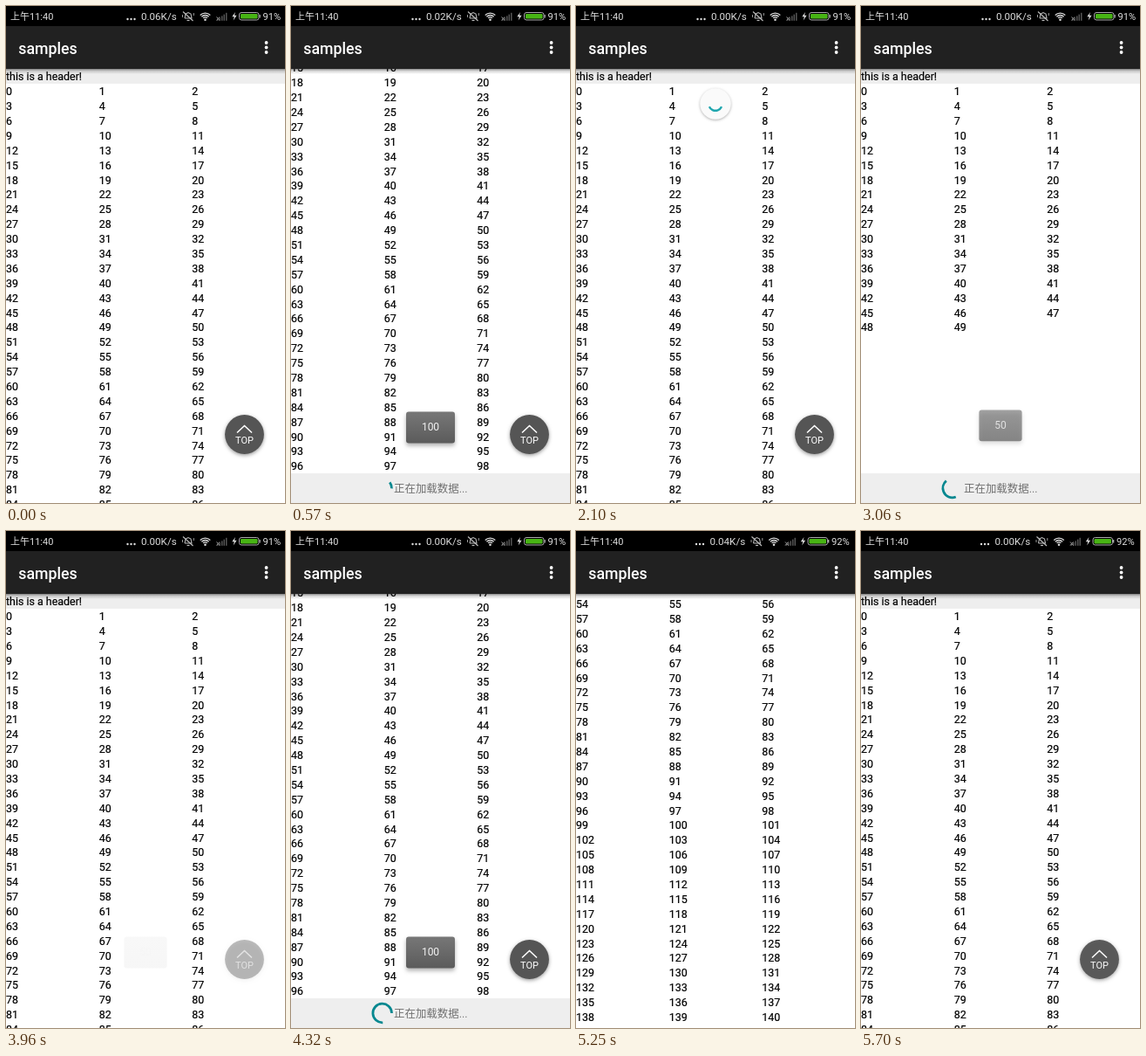
Animation of 320x569 px, one loop 5.79 s. Source, as an HTML page with a canvas:

```html
<!DOCTYPE html>
<html lang="zh">
<head>
<meta charset="utf-8">
<title>samples</title>
<style>
html, body { margin: 0; width: 100%; height: 100%; overflow: hidden; background: #fff; }
canvas { display: block; width: 320px; height: 569px; }
</style>
</head>
<body>
<canvas id="stage"></canvas>
<script>
const W = 320, H = 569, LOOP = 5790, ROW = 16.89, BAR = 72;
const FONT = 'Roboto, "Noto Sans CJK SC", "Noto Sans CJK", sans-serif';
const canvas = document.getElementById('stage');
const c = canvas.getContext('2d');
const dpr = window.devicePixelRatio || 1;
canvas.width = W * dpr;
canvas.height = H * dpr;

const LOAD_SCROLL = 111.3, END_SCROLL = 381.3;
const SCROLL = [[60, 0], [270, LOAD_SCROLL], [1140, LOAD_SCROLL], [1140, END_SCROLL],
  [1380, END_SCROLL], [1520, 0], [4020, 0], [4200, LOAD_SCROLL], [5040, LOAD_SCROLL],
  [5040, END_SCROLL], [5220, END_SCROLL], [5340, 0]];
const COUNT = [[0, 100], [1140, 150], [2940, 50], [3750, 100], [5040, 150]];
const TOP_ALPHA = [[1380, 1], [1380, 0], [1520, 0], [1780, 1], [2940, 1], [2940, 0],
  [3780, 0], [4250, 1], [5220, 1], [5220, 0], [5420, 0], [5715, 1]];
const PULL = [[1590, 50], [1740, 137], [1830, 137], [1980, 112]];
const SPEED = [[0, '0.06'], [300, '0.02'], [900, '0.00'], [4350, '0.03'], [4650, '0.00'],
  [5130, '0.04'], [5550, '0.00']];

const clamp = x => Math.max(0, Math.min(1, x));
const ease = x => { x = clamp(x); return x * x * (3 - 2 * x); };

// Interpolated value of a [time, value] track.
function track(keys, t, curve = ease) {
  let prev = keys[0];
  for (const key of keys) {
    if (key[0] > t) {
      if (key === prev) return key[1];
      return prev[1] + (key[1] - prev[1]) * curve((t - prev[0]) / (key[0] - prev[0]));
    }
    prev = key;
  }
  return prev[1];
}

// Latest value of a stepped track.
const step = (keys, t) => keys.filter(k => k[0] <= t).pop()[1];

function text(str, x, y, size, color, align = 'left', weight = 400, bold = 0) {
  c.save();
  c.font = `${weight} ${size}px ${FONT}`;
  c.fillStyle = c.strokeStyle = color;
  c.textAlign = align;
  c.translate(x, y);
  c.rotate(1e-4); // keeps the baseline from snapping to whole pixels
  c.fillText(str, 0, 0);
  if (bold) {
    c.lineWidth = bold;
    c.strokeText(str, 0, 0);
  }
  c.restore();
}

const listText = (str, x, top) => text(str, x, top + 13.3, 12.44, '#000', 'left', 400, 0.2);

function rect(x, y, w, h, color) {
  c.fillStyle = color;
  c.fillRect(x, y, w, h);
}

function disc(x, y, r, color) {
  c.fillStyle = color;
  c.beginPath();
  c.arc(x, y, r, 0, 2 * Math.PI);
  c.fill();
}

function line(points, color, width) {
  c.strokeStyle = color;
  c.lineWidth = width;
  c.beginPath();
  points.forEach(p => c.lineTo(...p));
  c.stroke();
}

function shadow(alpha, blur, dy) {
  c.shadowColor = `rgba(0,0,0,${alpha})`;
  c.shadowBlur = blur * dpr;
  c.shadowOffsetY = dy * dpr;
}

const noShadow = () => shadow(0, 0, 0);

function arc(x, y, r, from, sweep, color, width) {
  const rad = Math.PI / 180;
  c.strokeStyle = color;
  c.lineWidth = width;
  c.beginPath();
  c.arc(x, y, r, from * rad, (from + sweep) * rad);
  c.stroke();
}

// Indeterminate ring: the head runs ahead, then the tail catches up.
function ring(x, y, r, t, origin, base, color, width) {
  const n = (t - origin) / 580, p = n - Math.floor(n);
  const head = ease(2 * p), tail = ease(2 * p - 1);
  arc(x, y, r, base + 250 * tail + 110 * p, 40 + 250 * (head - tail), color, width);
}

function drawList(t) {
  const count = step(COUNT, t), scroll = track(SCROLL, t);
  const top = BAR + ROW - scroll;
  rect(0, top - ROW, W, ROW, '#eee');
  listText('this is a header!', 0, top - ROW);
  for (let i = 0; i < count; i++) {
    const y = top + Math.floor(i / 3) * ROW;
    if (y > BAR - ROW && y < H) listText(i, (i % 3) * W / 3, y);
  }
  if (count === 150) {
    const y = top + 50 * ROW;
    rect(0, y, W, ROW + 1, '#eee');
    listText('there is no more data,this is a footer!', 0, y);
    return;
  }
  const y = count === 50 ? 535 : 535 + LOAD_SCROLL - scroll;
  if (y >= H) return;
  rect(0, y, W, 35, '#eee');
  const phase = t < 2000 ? [570, -38] : [4658, 41];
  ring(104.7, y + 17, 10.8, t, ...phase, '#078890', 2.8);
  text('正在加载数据...', 118, y + 22, 12.44, '#707070');
}

function drawPull(t) {
  if (t < 1590 || t >= 2940) return;
  const y = track(PULL, t), s = 1 - clamp((t - 2850) / 90);
  c.save();
  c.translate(160, y);
  c.scale(s, s);
  shadow(0.3, 3, 1);
  disc(0, 0, 17.8, '#fafafa');
  noShadow();
  if (t < 1830) arc(0, 0, 7.8, -70 + (y - 50) * 2, 280 * clamp((y - 60) / 70), '#1fa6ae', 2.4);
  else ring(0, 0, 7.8, t, 1983, 3, '#1fa6ae', 2.4);
  c.restore();
}

function drawTop(t) {
  const x = 273.5, y = 490.5, alpha = track(TOP_ALPHA, t, clamp);
  c.save();
  c.globalAlpha = alpha;
  shadow(0.4 * alpha, 4, 1.5);
  disc(x, y, 22.4, '#555');
  noShadow();
  c.globalAlpha = Math.sqrt(alpha);
  line([[x - 8.5, y - 2], [x, y - 10], [x + 8.5, y - 2]], '#fff', 1.6);
  text('TOP', x, y + 10.6, 11, '#fff', 'center');
  c.restore();
}

function drawToast(t, start, label) {
  const show = clamp((t - start) / 90), hide = clamp((t - start - 870) / 96);
  const alpha = show * (1 - hide);
  if (!alpha) return;
  const w = label.length * 6.75 + 35.7;
  c.save();
  c.globalAlpha = alpha;
  c.translate(160, 464.6 - 9 * (1 - ease(show)));
  const fill = c.createLinearGradient(0, 0, 0, 36);
  fill.addColorStop(0, '#777');
  fill.addColorStop(1, '#5b5b5b');
  c.fillStyle = fill;
  shadow(0.3 * alpha, 5, 3);
  c.beginPath();
  c.roundRect(-w / 2, 0, w, 35.8, 3);
  c.fill();
  noShadow();
  c.globalAlpha = Math.sqrt(alpha);
  text(label, 0, 21.7, 12, '#f2f2f2', 'center');
  c.restore();
}

function drawAppBar() {
  const fade = c.createLinearGradient(0, BAR, 0, BAR + 6);
  fade.addColorStop(0, 'rgba(0,0,0,.45)');
  fade.addColorStop(0.4, 'rgba(0,0,0,.16)');
  fade.addColorStop(1, 'rgba(0,0,0,0)');
  rect(0, BAR, W, 6, fade);
  rect(0, 0, W, BAR, '#212121');
  rect(0, 0, W, 23, '#000');
  text('samples', 14.2, 54.7, 17.8, '#fff', 'left', 500);
  for (const y of [42, 47.5, 53]) disc(298.6, y, 1.9, '#fff');
}

function drawStatus(t) {
  const ink = '#ddd', late = t >= 5190;
  text('上午11:40', 5, 15.9, 11, ink);
  c.save();
  if (late) c.translate(-1.5, 0);
  for (const x of [139.5, 143.5, 147.5]) disc(x, 15, 1.2, ink);
  text(step(SPEED, t) + 'K/s', 155, 16.2, 11.6, ink);

  // Muted bell
  line([[205, 14], [206, 9], [209, 7.5], [212, 9], [213, 14], [205, 14]], '#bbb', 1.1);
  line([[203, 6.5], [214.5, 17]], '#bbb', 1.2);
  line([[207.5, 16.5], [210.5, 16.5]], '#bbb', 1.2);
  line([[202.5, 10], [202.5, 13]], '#999', 1);
  line([[215.3, 8], [215.3, 11]], '#999', 1);

  // Wi-Fi
  for (const r of [3.4, 5.8, 8.2]) arc(228.5, 16.3, r, 225, 90, ink, 1.3);
  disc(228.5, 15.7, 1.3, ink);

  // Signal without service
  for (let i = 0; i < 5; i++) rect(242 + i * 2.5, 15 - i * 1.8, 1.5, 1.8 + i * 1.8, '#555');
  line([[241.5, 12.5], [245, 16.5]], '#999', 1);
  line([[245, 12.5], [241.5, 16.5]], '#999', 1);

  // Charging battery
  c.fillStyle = ink;
  c.beginPath();
  [[263, 7], [259.3, 12.3], [261.8, 12.3], [260.7, 16.5], [264.6, 10.8], [262, 10.8]]
    .forEach(p => c.lineTo(...p));
  c.fill();
  c.strokeStyle = '#aaa';
  c.lineWidth = 1;
  c.beginPath();
  c.roundRect(267.5, 7.5, 22.5, 8.5, 2.5);
  c.stroke();
  rect(290.5, 10, 1.3, 3.5, '#aaa');
  c.fillStyle = '#48b414';
  c.beginPath();
  c.roundRect(269, 9, 19.5, 5.5, 1.2);
  c.fill();
  text(late ? '92%' : '91%', 294.5, 16.1, 11.2, ink);
  c.restore();
}

function draw(t) {
  c.setTransform(dpr, 0, 0, dpr, 0, 0);
  rect(0, 0, W, H, '#fff');
  drawList(t);
  drawPull(t);
  drawTop(t);
  drawAppBar();
  drawStatus(t);
  drawToast(t, 270, '100');
  drawToast(t, 3000, '50');
  drawToast(t, 4230, '100');
}

const begin = performance.now();
function tick() {
  draw((performance.now() - begin) % LOOP);
  requestAnimationFrame(tick);
}
tick();
</script>
</body>
</html>
```
